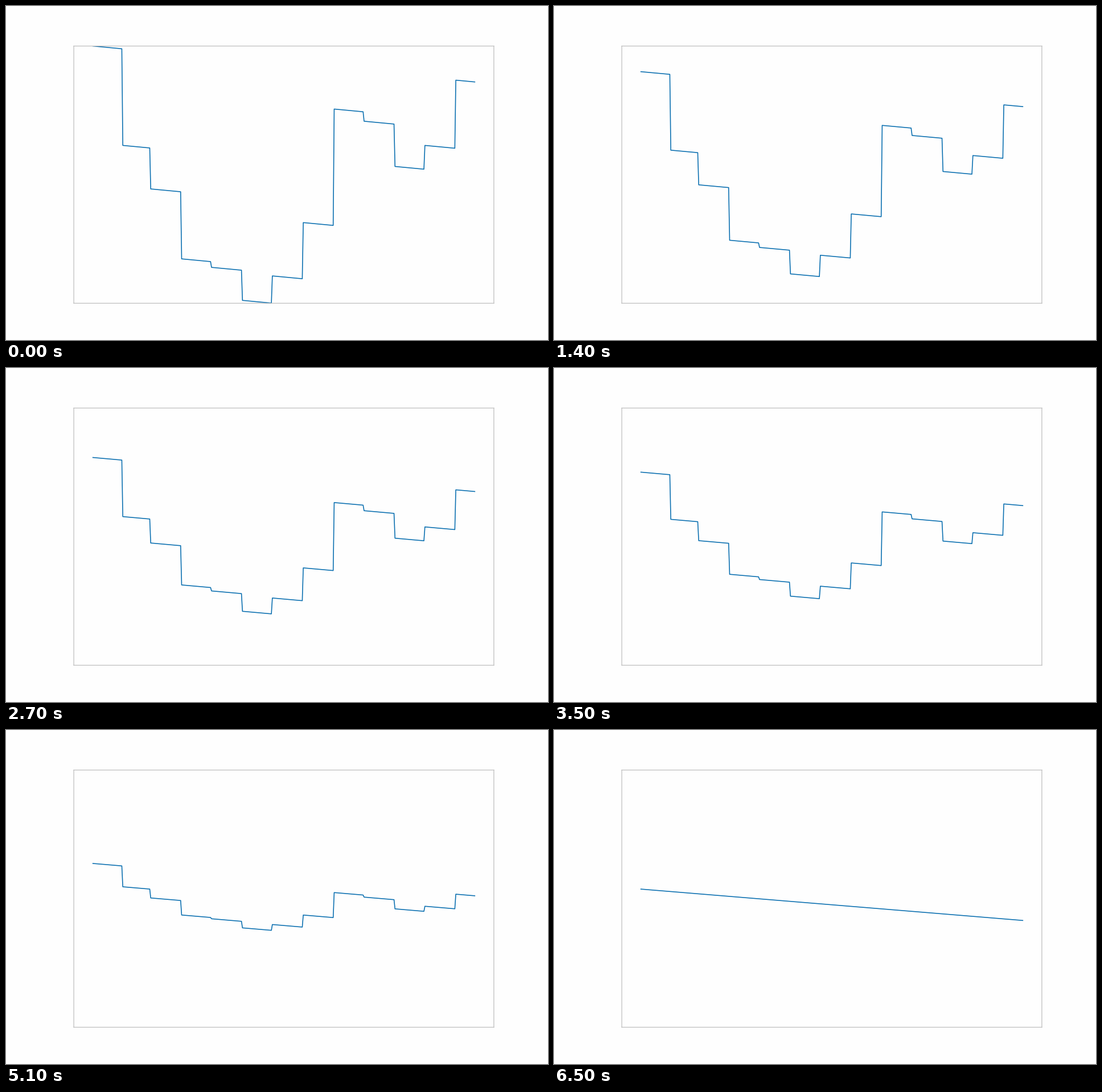
Animation of 952x588 px, one loop 8000 ms. Source, as a matplotlib script:

```python
import numpy as np
import matplotlib.pyplot as plt
from matplotlib.animation import FuncAnimation

WIDTH, HEIGHT, DPI = 952, 588, 100
INTERVAL, FRAMES, MORPH_FRAMES = 100, 80, 65
LEFT, RIGHT, TOP, BOTTOM = 119.1, 856.9, 70.5, 523.3
PAPER = "#fefefe"


def points(pixels):
    return pixels * 72 / DPI


# A yearly pattern by month rides on a falling straight line (y in pixels, downwards).
SEASON = np.array([0, 170, 242, 360, 370, 423, 375, 276, 71, 87.5, 162, 120])
dates = np.arange("2011-01-02", "2012-01-21", dtype="datetime64[D]")
month = dates.astype("datetime64[M]").astype(int) % 12

progress = np.linspace(0, 1, len(dates))
margin = (RIGHT - LEFT) / 22
x = LEFT + margin + progress * (RIGHT - LEFT - 2 * margin)
seasonal = TOP + SEASON[month] + 0.165 * np.arange(len(dates))
trend = 280.1 + 55.2 * progress

fig = plt.figure(figsize=(WIDTH / DPI, HEIGHT / DPI), dpi=DPI, facecolor=PAPER)
ax = fig.add_axes([LEFT / WIDTH, 1 - BOTTOM / HEIGHT,
                   (RIGHT - LEFT) / WIDTH, (BOTTOM - TOP) / HEIGHT],
                  facecolor=PAPER)
ax.set(xlim=(LEFT, RIGHT), ylim=(BOTTOM, TOP), xticks=[], yticks=[])
for spine in ax.spines.values():
    spine.set(color="#bcbcbc", linewidth=points(1.2), snap=False)
line, = ax.plot(x, seasonal, color="#0a6fb0", linewidth=points(1.6))


def update(frame):
    t = min(frame / MORPH_FRAMES, 1)
    line.set_ydata(seasonal + (trend - seasonal) * t)
    return line,


anim = FuncAnimation(fig, update, frames=FRAMES, interval=INTERVAL,
                     repeat=True, repeat_delay=0)
plt.show()
```
